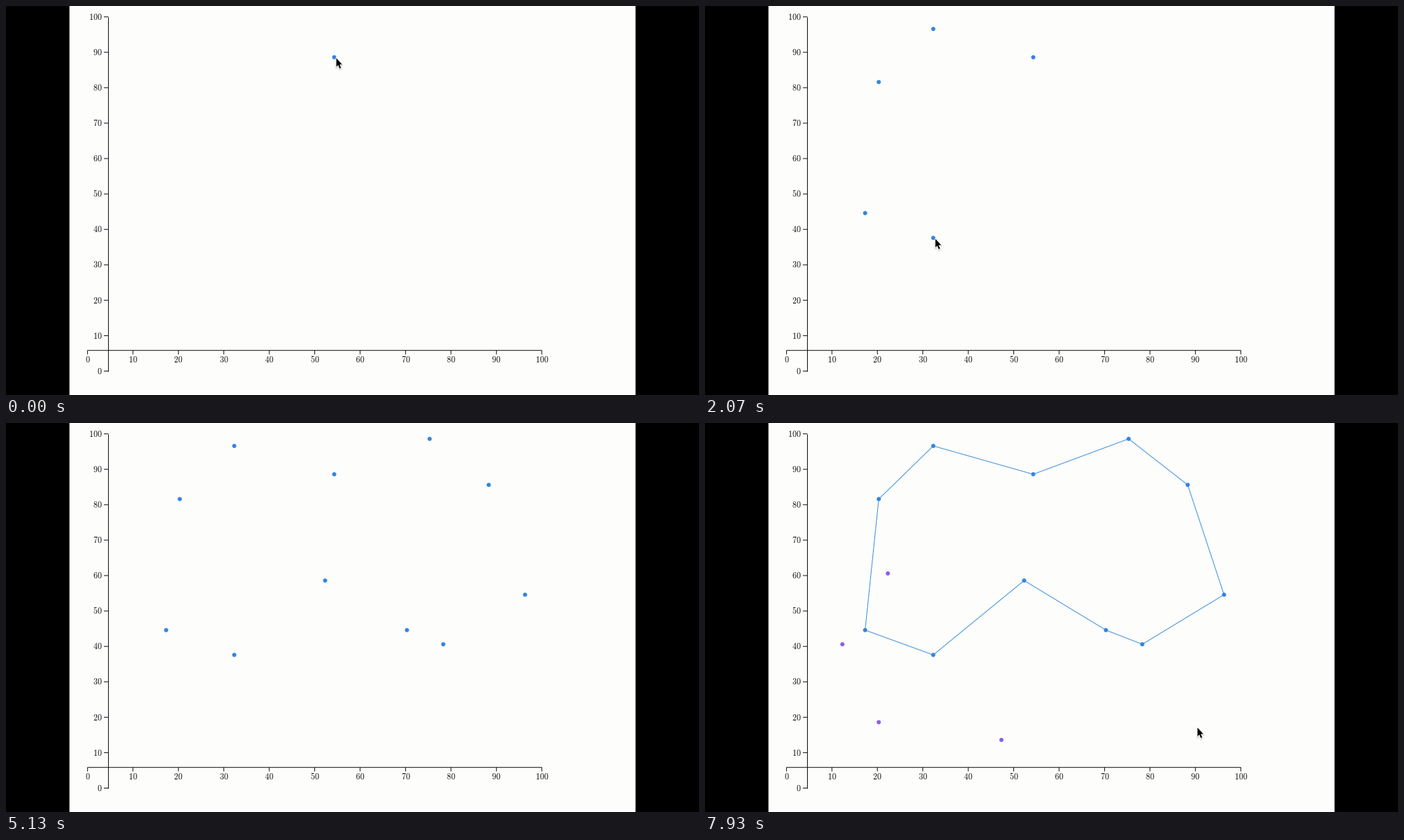
These frames come from a looping animation (998 px wide and 561 px high, 8000 ms). A matplotlib script:

```python
import numpy as np
import matplotlib.pyplot as plt
from matplotlib.animation import FuncAnimation
from matplotlib.patches import Circle, Polygon, Rectangle
from matplotlib.transforms import Affine2D

W, H, DPI = 998, 561, 64
PX = 72 / DPI  # points per pixel
FRAMES, INTERVAL = 160, 50
BEAT = 505  # ms between two clicks
INK, BLUE, PURPLE = "#0c0c0e", "#3186df", "#8c5df0"

plt.rcParams["mathtext.fontset"] = "cm"

CORNERS = [(54, 88), (32, 96), (20, 81), (17, 44), (32, 37), (52, 58),
           (70, 44), (78, 40), (96, 54), (88, 85), (75, 98)]
QUERIES = [(22, 60), (12, 40), (20, 18), (47, 13)]
DETOUR, EXIT = (68.3, 55.7), (89.7, 16.7)

# Times in beats
LAST_CORNER = len(CORNERS) - 1
CLOSE = LAST_CORNER + 0.83
FIRST_QUERY = LAST_CORNER + 1.3
HIDE = LAST_CORNER + 0.05


def sx(v):
    return 117.4 + 6.543 * v


def sy(v):
    return 526.5 - 5.108 * v


def grid_point(x, y):
    return sx(x + 0.3), sy(y + 0.6)


clicks = ([(i, p, BLUE) for i, p in enumerate(CORNERS)]
          + [(FIRST_QUERY + i, p, PURPLE) for i, p in enumerate(QUERIES)])

# The mouse reaches each point just before its click and leaves just after
stops = [(beat - 0.15, beat + 0.1, p) for beat, p, _ in clicks]
stops += [(5.62, 5.65, DETOUR), (CLOSE, CLOSE, CORNERS[-1]),
          (FIRST_QUERY + len(QUERIES), FRAMES, EXIT)]
stops.sort()


def cursor_tip(beat):
    i = max(k for k, stop in enumerate(stops) if stop[0] <= beat)
    arrive, leave, here = stops[i]
    here = np.array(grid_point(*here))
    if beat > leave:
        there = np.array(grid_point(*stops[i + 1][2]))
        u = (beat - leave) / (stops[i + 1][0] - leave)
        here = here + (there - here) * (1 - (1 - u) ** 4)
    return here + (3, 1.2)


fig = plt.figure(figsize=(W / DPI, H / DPI), dpi=DPI, facecolor="black")
ax = fig.add_axes([0, 0, 1, 1])
ax.set(xlim=(0, W), ylim=(H, 0))
ax.axis("off")
ax.add_patch(Rectangle((91.4, -1), W - 2 * 91.4, H + 2, fc="#fdfdfc", lw=0,
                       snap=False))


def stroke(xs, ys, color=INK, **style):
    return ax.plot(xs, ys, color=color, lw=PX, solid_joinstyle="miter",
                   solid_capstyle="butt", **style)[0]


def label(x, y, value, ha):
    ax.text(x, y, rf"$\mathrm{{{value}}}$", fontsize=12 * PX, color=INK,
            ha=ha, va="baseline")


AXIS_X, AXIS_Y = 147.5, 496.7
stroke([AXIS_X, AXIS_X], [sy(100), sy(0)])
stroke([sx(0), sx(100)], [AXIS_Y, AXIS_Y], snap=False)
for v in range(0, 101, 10):
    stroke([141, AXIS_X], [sy(v), sy(v)], snap=False)
    stroke([sx(v), sx(v)], [AXIS_Y, 502.5], snap=False)
    label(138.7, sy(v) + 4.2, v, "right")
    label(sx(v), 514.5, v, "center")

ring = np.array([grid_point(*p) for p in CORNERS + CORNERS[:1]])
outline = stroke(ring[:, 0], ring[:, 1], "#3c8fdc", zorder=3)

dots = [(beat, ax.add_patch(Circle(grid_point(*p), 3, fc=color, lw=0,
                                   zorder=4)))
        for beat, p, color in clicks]

ARROW = [(0, 0), (0, 12.6), (2.7, 10), (4.8, 15), (6.8, 14.1), (4.7, 9.2),
         (8.4, 9.2)]
cursor = []  # (patch, downward offset)


def arrow_layer(drop, color, width, zorder):
    patch = Polygon(ARROW, closed=True, joinstyle="round", fc=color, ec=color,
                    lw=width * PX, zorder=zorder)
    cursor.append((ax.add_patch(patch), drop))


for spread in (1, 2.5, 4):
    arrow_layer(1.4, (0, 0, 0, 0.05), spread, 5)
arrow_layer(0, "white", 1.8, 6)
arrow_layer(0, "black", 0, 7)


def draw(frame):
    beat = frame * INTERVAL / BEAT
    x, y = cursor_tip(beat)
    for patch, drop in cursor:
        patch.set_transform(Affine2D().translate(x, y + drop) + ax.transData)
        patch.set_visible(not HIDE <= beat < CLOSE)
    for born, dot in dots:
        dot.set_visible(beat >= born)
    outline.set_visible(beat >= CLOSE)
    return []


anim = FuncAnimation(fig, draw, frames=FRAMES, interval=INTERVAL, repeat=True,
                     repeat_delay=0)
plt.show()
```
